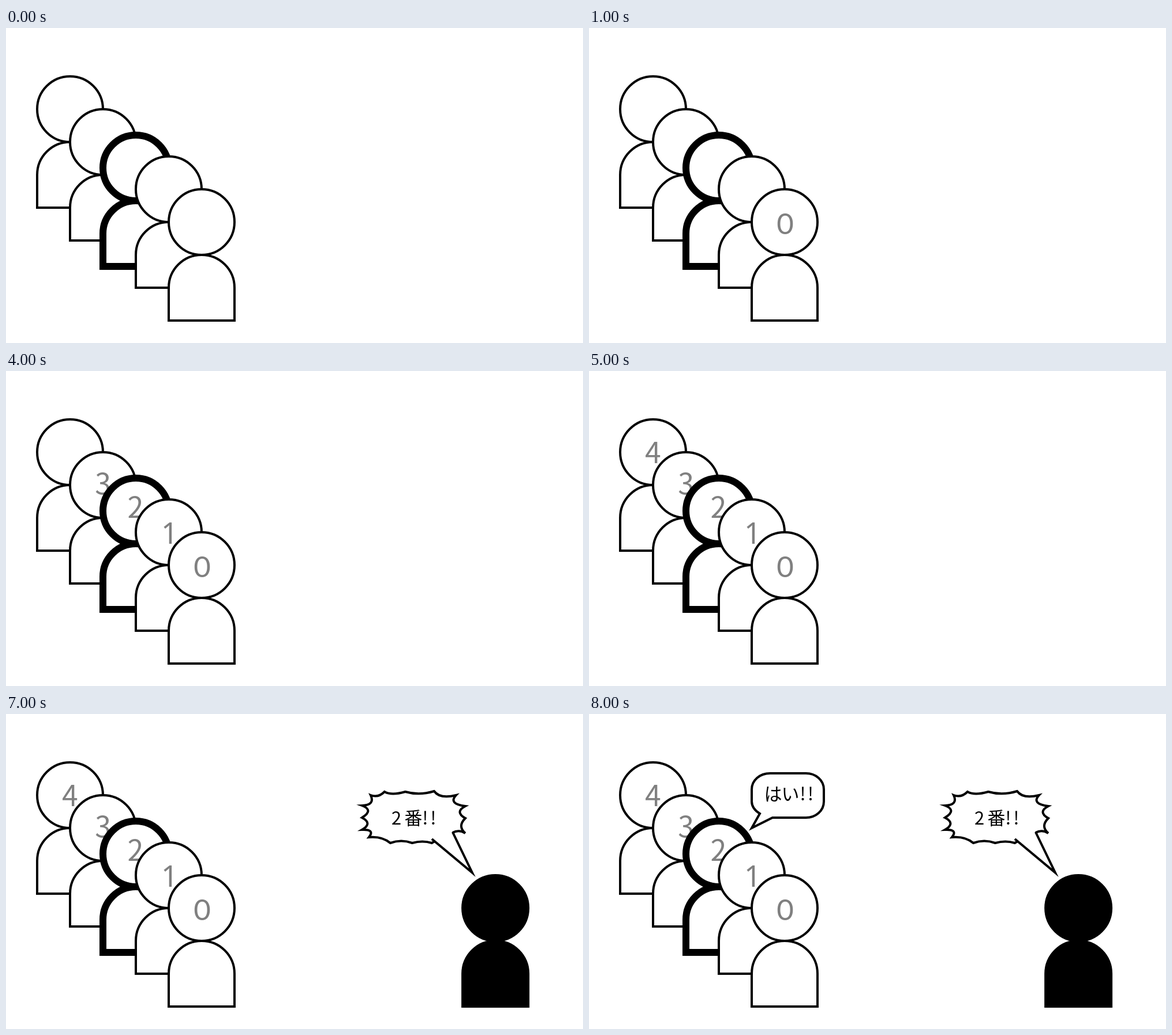
An HTML page with a canvas for the animation above (9000 ms loop, 1000 px wide and 547 px high).

```html
<!DOCTYPE html>
<html lang="ja">
<head>
<meta charset="utf-8">
<title>番号</title>
<style>
  html, body { margin: 0; width: 100%; height: 100%; overflow: hidden; background: #fff; }
  canvas { display: block; width: 1000px; height: 547px; }
</style>
</head>
<body>
<canvas id="stage" width="1000" height="547"></canvas>
<script>
const ctx = document.getElementById('stage').getContext('2d');
const STEP = 1000, STEPS = 9, R = 57, GRAY = '#808080';
const CJK = '"Noto Sans CJK JP", "Noto Sans CJK", sans-serif';
const NOTO = '"Noto Sans", "Open Sans", sans-serif';
const LATO = 'Lato, sans-serif';

// Back to front; ink is the centre of the digit, base its baseline.
const people = [
  { n: 4, x: 111, y: 141, w: 4, ink: 111, base: 160.3, font: '50px ' + CJK },
  { n: 3, x: 168, y: 198, w: 4, ink: 167.3, base: 213.5, font: '50px ' + CJK },
  { n: 2, x: 225, y: 243, w: 12, ink: 224.5, base: 254.5, font: '50px ' + CJK },
  { n: 1, x: 282, y: 280, w: 4, ink: 280.5, base: 299.7, font: '51px ' + NOTO },
  { n: 0, x: 339, y: 337, w: 4, ink: 340.2, base: 358.3, font: '51px ' + LATO }
];

const spiky = new Path2D(`M774 206 Q785 200 796 207 Q782 195 796 181 Q777 170 796 160
  Q766 156 780 141 Q752 148 742 134 Q716 142 692 135 Q668 142 656 135 Q645 146 632 141
  Q640 158 617 159 Q638 167 617 180 Q636 190 617 201 Q640 200 629 214 Q652 212 666 224
  Q685 217 704 224 Q722 219 738 224 L743 221`);
const spikyTail = new Path2D('M738 217 L808 275.5 L774 205');
const rounded = new Path2D(`M318 180 H376 C393 180 407 168 407 152 V131 C407 115 393 103 376 103
  H314 C296 103 282 115 282 131 V152 C282 161 288 168 296 173 L282 198 Z`);

function paint(path, fill, width) {
  ctx.fillStyle = fill;
  ctx.fill(path);
  ctx.lineWidth = width;
  ctx.strokeStyle = '#000';
  ctx.stroke(path);
}

function label(text, cx, base, font, color) {
  ctx.font = font;
  ctx.fillStyle = color;
  const m = ctx.measureText(text);
  ctx.fillText(text, cx - (m.actualBoundingBoxRight - m.actualBoundingBoxLeft) / 2, base);
}

function person(x, y, width, fill) {
  const shape = new Path2D();
  shape.arc(x, y, R, 0, Math.PI * 2);
  shape.closePath();
  shape.moveTo(x - R, y + 3 * R);
  shape.arc(x, y + 2 * R, R, Math.PI, 0);
  shape.lineTo(x + R, y + 3 * R);
  shape.closePath();
  paint(shape, fill, width);
}

function speak(glyphs, base) {
  for (const [text, cx] of glyphs) label(text, cx, base, '31px ' + CJK, '#000');
}

function draw(step) {
  ctx.fillStyle = '#fff';
  ctx.fillRect(0, 0, 1000, 547);
  for (const p of people) {
    person(p.x, p.y, p.w, '#fff');
    if (step > p.n) label(String(p.n), p.ink, p.base, p.font, GRAY);
  }
  if (step >= 6) person(848.2, 337, 4, '#000');
  if (step >= 7) {
    paint(spiky, '#fff', 4);
    paint(spikyTail, '#fff', 4);
    speak([['2', 676.5], ['番', 706], ['!', 726.5], ['!', 740.5]], 191.5);
  }
  if (step >= 8) {
    paint(rounded, '#fff', 4);
    speak([['は', 320], ['い', 349.5], ['!', 370.5], ['!', 384]], 149.7);
  }
}

const start = performance.now();
function tick() {
  draw(Math.floor((performance.now() - start) / STEP) % STEPS);
  requestAnimationFrame(tick);
}
tick();
</script>
</body>
</html>
```
